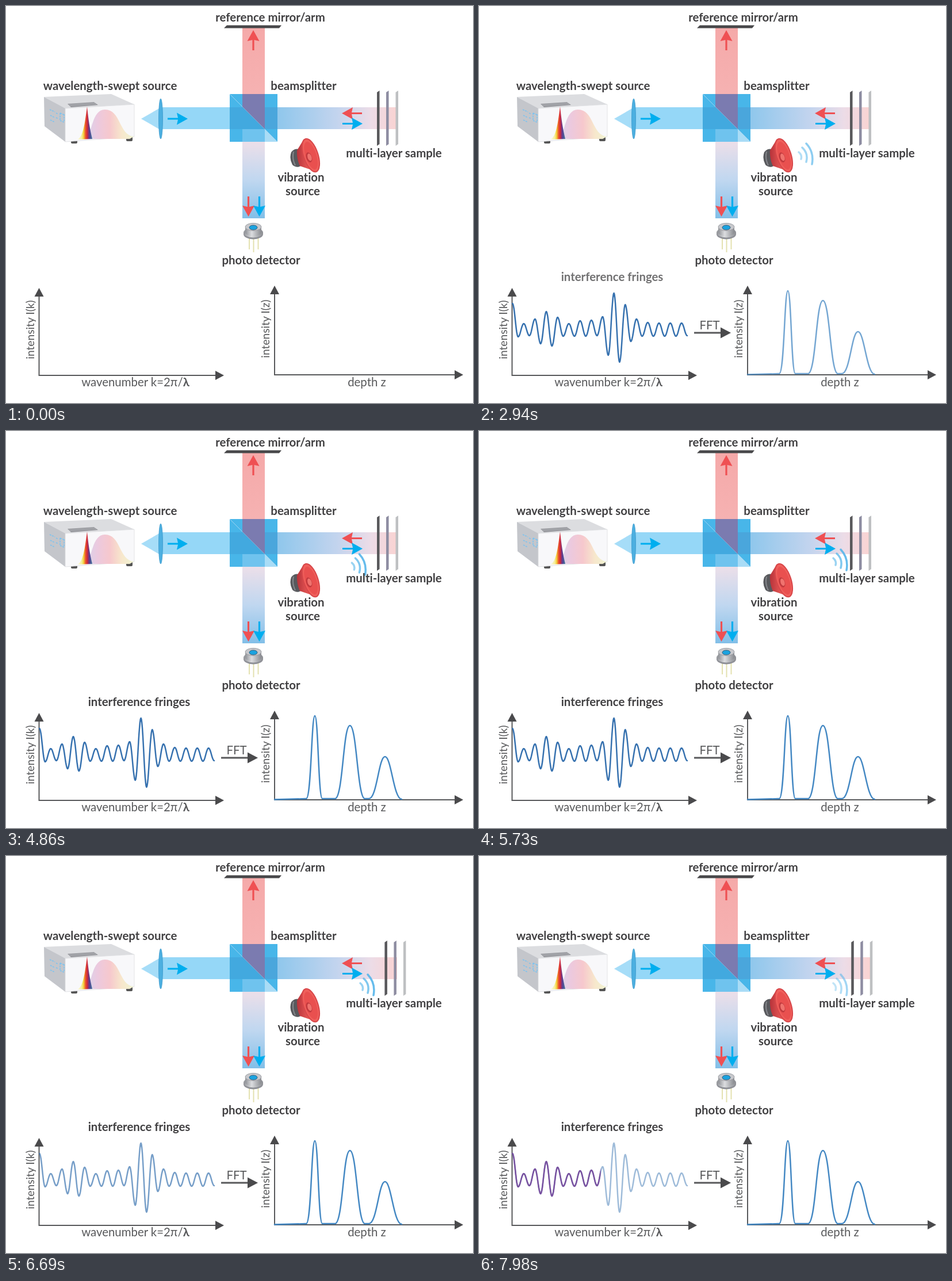
An HTML page for the animation above (8 s loop, 812 by 690 pixels).

```html
<!DOCTYPE html>
<html lang="en">
<head>
<meta charset="utf-8">
<title>Swept-source interferometer</title>
<style>
  html, body { margin: 0; width: 100%; height: 100%; overflow: hidden; background: #fff; }
  svg { display: block; width: 812px; height: 690px; }
  text { font: 700 20.4px Lato, sans-serif; font-variant-ligatures: none; fill: #414042; text-anchor: middle; }
  .axis { font-weight: 400; fill: #58595b; }
  .side { font-size: 19.2px; }
  .line { fill: none; stroke-linejoin: round; stroke-linecap: round; stroke-width: 2.5; }
  .rule { stroke: #58595b; stroke-width: 2; fill: none; }
  .head { fill: #4a4a4c; }
  .red { fill: #ef5053; }
  .blue { fill: #00aeef; }
</style>
</head>
<body>
<svg viewBox="0 0 812 690">
  <defs>
    <linearGradient id="armBeam" x2="0" y2="1">
      <stop stop-color="#f5a9a9"/><stop offset="1" stop-color="#f6b2b2"/>
    </linearGradient>
    <linearGradient id="sampleBeam">
      <stop stop-color="#8fc7ec"/><stop offset=".5" stop-color="#c3d4ee"/>
      <stop offset=".78" stop-color="#ecdce7"/><stop offset="1" stop-color="#fad3d2"/>
    </linearGradient>
    <linearGradient id="detectorBeam" x2="0" y2="1">
      <stop stop-color="#ecdfe9"/><stop offset=".5" stop-color="#c0d7f0"/><stop offset="1" stop-color="#82bfe8"/>
    </linearGradient>
    <linearGradient id="rainbow">
      <stop stop-color="#fdfbe6"/><stop offset=".3" stop-color="#f4ee9c"/><stop offset=".42" stop-color="#f3d23a"/>
      <stop offset=".54" stop-color="#ec5a2a"/><stop offset=".66" stop-color="#d2283a"/>
      <stop offset=".8" stop-color="#5a3a92"/><stop offset="1" stop-color="#3d7a9a"/>
    </linearGradient>
    <linearGradient id="pastel">
      <stop stop-color="#d9d3ec"/><stop offset=".25" stop-color="#ecc9de"/><stop offset=".5" stop-color="#f6c8cd"/>
      <stop offset=".75" stop-color="#f7e7cc"/><stop offset="1" stop-color="#f0f4d2"/>
    </linearGradient>
    <linearGradient id="metal">
      <stop stop-color="#8f9196"/><stop offset=".4" stop-color="#dcdde0"/><stop offset="1" stop-color="#898b90"/>
    </linearGradient>
    <linearGradient id="horn">
      <stop stop-color="#b8333a"/><stop offset=".7" stop-color="#ef5f5b"/>
    </linearGradient>
    <path id="arrow" d="M0 -1.6H18L16 -10.5L35 0L16 10.5L18 1.6H0Z"/>
    <path id="tip" d="M0 0L-15 -8V8Z"/>
    <path id="plate" d="M0 150L4.500 147V240L0 243Z"/>
    <clipPath id="blueWipe"><rect x="50" y="485" width="0" height="150"/></clipPath>
    <clipPath id="purpleWipe"><rect x="50" y="485" width="0" height="150"/></clipPath>
  </defs>

  <!-- beams -->
  <rect x="411" y="38" width="39" height="116" fill="url(#armBeam)"/>
  <rect x="472" y="176" width="208" height="38" fill="url(#sampleBeam)"/>
  <rect x="411" y="236" width="39" height="133" fill="url(#detectorBeam)"/>
  <rect x="271" y="176" width="118" height="38" fill="#95d7f7"/>
  <path d="M235 196L268 177V215Z" fill="#a6ddf8"/>
  <ellipse cx="269" cy="196" rx="3.500" ry="35" fill="#4cafe0" stroke="#3a98cc" stroke-width=".8"/>

  <!-- beamsplitter -->
  <rect x="389" y="153" width="83" height="83" fill="#48b6e9"/>
  <path d="M389 176H412L450 214H389Z" fill="#42a9df"/>
  <path d="M411 214H450V236H411Z" fill="#6fc3ee"/>
  <path d="M450 176H472V214H450Z" fill="#4aa6dc"/>
  <path d="M450 214L472 236H450Z" fill="#a9dcf6"/>
  <path d="M389 153L472 236" stroke="#9bd4f2" stroke-width="1"/>
  <path d="M411 153H450V214L411 175Z" fill="#7b7bb0"/>

  <!-- mirror -->
  <path d="M384 33.500H479L475 38.500H379Z" fill="#48484a"/>

  <!-- swept source -->
  <g fill="#555">
    <rect x="113" y="230" width="11" height="9" rx="2"/>
    <rect x="209" y="226" width="11" height="9" rx="2"/>
  </g>
  <path d="M66 158L103 177V236L67 209Z" fill="#c4c6cb"/>
  <path d="M66 158L183 153L223 171L103 178Z" fill="#dcdde0"/>
  <path d="M103 178L223 171V227L103 236Z" fill="#f8f8fa" stroke="#dcdde0" stroke-width=".8"/>
  <path d="M107 170L153 167L160 172L113 176Z" fill="#929398"/>
  <path d="M109 171.500L155 168.500M111 173.500L157 170.500" stroke="#b9bbc0" stroke-width=".8"/>
  <path d="M76 180l9 4m-8 6l8 4m-8 4l8 4m2-16l4 2m-4 6l4 2m3-10v12m7-10v13m-7-15l7 3m-7 10l7 3" stroke="#7cc3f0" stroke-width="1.600" stroke-dasharray="3 1.500" fill="none"/>
  <path d="M139 231C150 222 149 180 172 180C200 180 196 224 222 227L215 231Z" fill="url(#pastel)"/>
  <path d="M124 232C134 228 137 205 141 175C143 196 146 215 150 231Z" fill="url(#rainbow)"/>

  <!-- vibration source -->
  <path d="M496 254Q502 247 509 249L514 277Q506 283 498 276Q492 265 496 254Z" fill="#58595d"/>
  <path d="M500 253Q497 265 503 277" stroke="#85878c" stroke-width="2" fill="none"/>
  <path d="M506 251L518 231L540 288L511 278Q505 265 506 251Z" fill="url(#horn)"/>
  <g transform="rotate(-18 530 259.500)">
    <ellipse cx="530" cy="259.500" rx="12.500" ry="30" fill="#ef5f5b" stroke="#d8474a" stroke-width="2"/>
    <ellipse cx="530" cy="260" rx="9.500" ry="25" fill="#e9504f"/>
    <ellipse cx="526" cy="262" rx="5" ry="9" fill="#c23a3e"/>
    <ellipse cx="527" cy="262" rx="3.500" ry="6.500" fill="#f0736e"/>
  </g>

  <!-- photo detector -->
  <path d="M423 403V423M430.500 405V428M438.500 403V423" stroke="#e4e1b0" stroke-width="2"/>
  <ellipse cx="430" cy="396.500" rx="17" ry="9" fill="#8f9197"/>
  <ellipse cx="430" cy="394" rx="17" ry="8.500" fill="url(#metal)"/>
  <path d="M416 384V393A14 7 0 0 0 444 393V384Z" fill="url(#metal)"/>
  <ellipse cx="430" cy="384" rx="14" ry="6.500" fill="#c7c8cc" stroke="#9b9da2"/>
  <ellipse cx="430" cy="385" rx="7" ry="4" fill="#1ba3e0" stroke="#33607c"/>

  <g id="plates">
    <use href="#plate" x="645" fill="#58585b"/>
    <use href="#plate" x="661" fill="#8e8da2"/>
    <use href="#plate" x="677.500" fill="#bec0c2"/>
  </g>

  <use href="#arrow" class="blue" transform="translate(281 196)"/>
  <use href="#arrow" class="red" transform="translate(430 77) rotate(-90)"/>
  <use href="#arrow" class="red" transform="translate(619 186.500) rotate(180)"/>
  <use href="#arrow" class="blue" transform="translate(585 204.500)"/>
  <use href="#arrow" class="red" transform="translate(421.500 331) rotate(90)"/>
  <use href="#arrow" class="blue" transform="translate(440.500 331) rotate(90)"/>

  <g id="sound" class="line" stroke="#55b5ea" style="stroke-width:3.500">
    <path d="M616 221q6 5 4 12" opacity=".6"/>
    <path d="M622 213q11 10 7 25" opacity=".75"/>
    <path d="M629 206q14 15 10 36" opacity=".9"/>
  </g>

  <text x="459.500" y="27">reference mirror/arm</text>
  <text x="181" y="145.500">wavelength-swept source</text>
  <text x="517.500" y="145.500">beamsplitter</text>
  <text x="674.500" y="263">multi-layer sample</text>
  <text x="513" y="305">vibration</text>
  <text x="516" y="328.500">source</text>
  <text x="443.500" y="449">photo detector</text>

  <!-- plots -->
  <path class="rule" d="M57.500 500V642H368M467 496V641H785"/>
  <g class="head">
    <use href="#tip" transform="translate(57.500 490) rotate(-90)"/>
    <use href="#tip" transform="translate(379 642)"/>
    <use href="#tip" transform="translate(467 486) rotate(-90)"/>
    <use href="#tip" transform="translate(795 641)"/>
  </g>
  <text class="axis" x="225" y="661">wavenumber k=2π/<tspan font-weight="700">λ</tspan></text>
  <text class="axis" x="627.500" y="661">depth z</text>
  <text class="axis side" transform="translate(49 562.500) rotate(-90)">intensity I(k)</text>
  <text class="axis side" transform="translate(458 561) rotate(-90)">intensity I(z)</text>

  <g clip-path="url(#blueWipe)"><path id="blueWave" class="line" stroke="#3671af"/></g>
  <g clip-path="url(#purpleWipe)"><path id="purpleWave" class="line" stroke="#7a51a0"/></g>

  <text id="title" x="231.500" y="478">interference fringes</text>
  <g id="transform">
    <text class="axis" x="401" y="562">FFT</text>
    <path class="rule" d="M374 568H424" style="stroke-width:3.200"/>
    <use href="#tip" class="head" transform="translate(438 568) scale(1.200)"/>
  </g>
  <path id="depth" class="line" stroke="#4488c3" d="M467 640.500L522 639C531 639 531 495 537 495S543 639 550 639H572C586 639 586 512 598 512S611 639 624 639H631C645 639 648 566 659 566S674 640 688 640"/>
</svg>
<script>
  const LOOP = 8000;
  const $ = id => document.getElementById(id);
  const progress = (t, from, to) => Math.min(1, Math.max(0, (t - from) / (to - from)));
  const smooth = u => (1 - Math.cos(Math.PI * u)) / 2;

  // Alternating crests and troughs, joined by half cosines.
  const extremes = [517, 575, 552, 573, 544, 587, 531, 591, 541, 574, 552, 574, 547, 574, 546, 573,
    540, 607, 499, 619, 519, 583, 544, 574, 550, 574, 551, 574, 551, 574, 551, 573];
  const waveStart = 58.2, halfPeriod = 9.8, steps = 12;

  function wavePath() {
    const points = [];
    for (let k = 0; k <= (extremes.length - 1) * steps; k++) {
      const i = Math.floor(k / steps), y = extremes[i], next = extremes[i + 1] ?? y;
      const x = waveStart + halfPeriod * k / steps;
      points.push(x.toFixed(1) + ' ' + (y + (next - y) * smooth(k % steps / steps)).toFixed(1));
    }
    return 'M' + points.join('L');
  }

  const wipeTo = (id, x) => $(id).firstElementChild.setAttribute('width', x - 50);
  const move = (id, x, y) => $(id).setAttribute('transform', `translate(${x} ${y})`);
  const fade = (id, opacity) => $(id).setAttribute('opacity', opacity);

  function draw(t) {
    wipeTo('blueWipe', 56 + 311 * progress(t, 0, 1960));
    wipeTo('purpleWipe', 56 + 311 * progress(t, 7000, 8960));

    fade('transform', progress(t, 1990, 2300));
    const reveal = progress(t, 2200, 3200);
    ['title', 'depth'].forEach(id => fade(id, reveal));

    const travel = smooth(progress(t, 3250, 5650)) - 1;
    move('sound', 60 * travel, -33 * travel);
    fade('sound', reveal * (1 - 0.4 * progress(t, 7000, 8000)));

    move('plates', 20 * smooth(2 * progress(t, 6020, 8220)), 0);
    fade('blueWave', 1 - 0.52 * progress(t, 6020, 7100));
  }

  $('blueWave').setAttribute('d', wavePath());
  $('purpleWave').setAttribute('d', wavePath());

  const start = performance.now();
  function tick() {
    draw((performance.now() - start) % LOOP);
    requestAnimationFrame(tick);
  }
  draw(0);
  requestAnimationFrame(tick);
</script>
</body>
</html>
```
